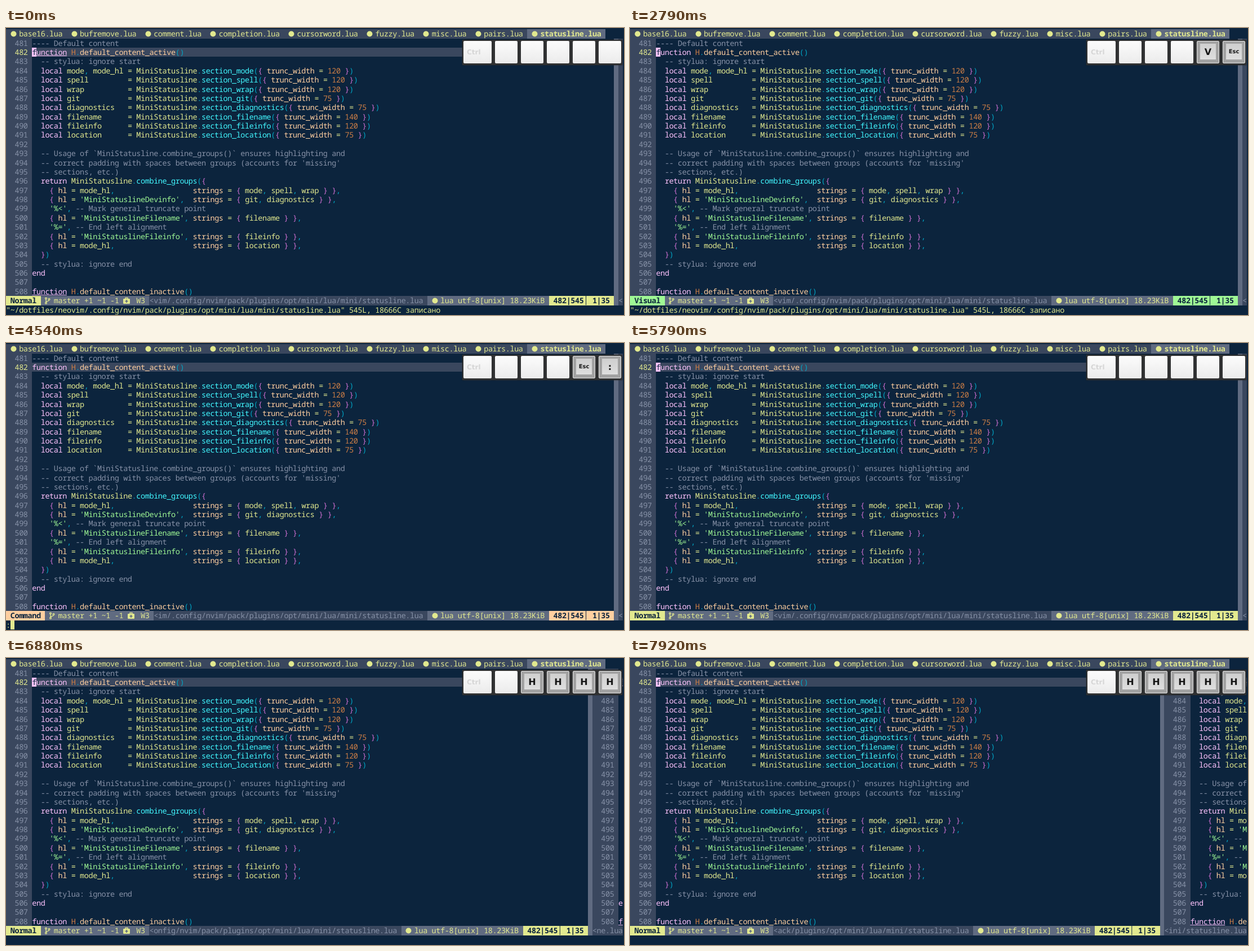
An HTML page for the animation above (8 s loop, 1097 by 511 pixels).

```html
<!DOCTYPE html>
<html lang="en">
<head>
<meta charset="utf-8">
<title>Editor statusline modes</title>
<style>
  :root {
    --w: 7.71px; --h: 16.38px;
    --bg: #0c243d; --bg1: #3a475e; --bg2: #606b81; --dim: #8691a7;
    --fg: #e2e98f; --peach: #ffcfa0; --orange: #cc7e46; --green: #9ff895;
    --purple: #ca6ecf; --cyan: #42f7ff; --pink: #ffc4ff; --blue: #00a5c5;
  }
  html, body { margin: 0; width: 100%; height: 100%; overflow: hidden; background: var(--bg); }
  #stage {
    position: relative; width: 1097px; height: 511px; overflow: hidden;
    background: var(--bg); color: var(--fg);
    font: 13.5px/var(--h) "Noto Sans Mono", "DejaVu Sans Mono", monospace;
    letter-spacing: calc(var(--w) - 1ch);
    font-variant-ligatures: none; font-kerning: none;
    text-rendering: geometricPrecision; white-space: pre;
  }
  #screen { position: absolute; left: 0; top: 2.3px; width: calc(var(--w) * 142); height: 509px; }
  .row { position: absolute; left: 0; height: var(--h); overflow: hidden; }
  #tabs { top: 0; width: 100%; }
  #tabs span, .status span { display: inline-block; height: var(--h); vertical-align: top; }
  #tabs .tab { background: var(--bg1); }
  #tabs .on { background: var(--bg2); font-weight: bold; }

  .win { position: absolute; top: var(--h); height: calc(var(--h) * 28); overflow: hidden; }
  .line { height: var(--h); width: 1100px; }
  .num { display: inline-block; width: calc(var(--w) * 6); height: var(--h); vertical-align: top; background: var(--bg1); color: var(--dim); }
  .here { background: var(--bg1); }
  .here .num { color: var(--fg); }
  .visual .here { background: none; }
  .mark .word { text-decoration: underline; }
  #split { position: absolute; top: var(--h); width: var(--w); height: calc(var(--h) * 29); background: var(--bg2); }

  .com { color: var(--dim); } .str { color: var(--green); } .kw { color: var(--pink); }
  .nr { color: var(--orange); } .fn { color: var(--cyan); } .fld { color: var(--peach); }
  .br { color: var(--purple); } .pn { color: var(--blue); }

  .status { top: calc(var(--h) * 29); background: var(--bg1); color: var(--dim); }
  .status .info { background: var(--bg2); color: var(--fg); }
  .status .mode { color: var(--bg); font-weight: bold; background: var(--mode); }
  #message { top: calc(var(--h) * 30); width: 100%; }

  #tabs .ico, .status .ico { position: relative; width: var(--w); }
  .ico svg { position: absolute; left: -1px; top: 2px; width: 13px; height: 13px; overflow: visible; }

  #cursor { position: absolute; height: var(--h); width: var(--w); overflow: hidden; color: var(--bg); background: var(--pink); }
  #cursor.insert { width: 2px; color: transparent; }
  #cursor.replace { height: 2px; margin-top: calc(var(--h) - 2px); color: transparent; }
  #cursor.command { background: var(--fg); color: transparent; }

  #keys {
    position: absolute; left: 810px; top: 21px; width: 284px; height: 45px;
    background: #303132; box-shadow: 0 0 2px #222;
    font-family: "DejaVu Sans", Verdana, sans-serif; font-weight: bold; letter-spacing: 0;
  }
  .key {
    position: absolute; top: 2px; width: 40px; height: 40px; box-sizing: border-box;
    line-height: 40px; text-align: center; color: #151515;
    background: linear-gradient(#fcfcfc, #ebebeb); border-radius: 2px;
  }
  .key.down {
    border: 1px solid #e8e8e8; line-height: 38px; font-size: 16px;
    background: linear-gradient(#cfcfcf, #dedede) 5px 4px / 28px 28px no-repeat #a2a2a2;
  }
  .key.long { font-size: 10px; }
  #ctrl { left: 2px; width: 50px; padding-left: 6px; font-size: 12px; text-align: left; color: #d6d6d6; }
</style>
</head>
<body>
<div id="stage">
  <div id="screen">
    <div id="tabs" class="row"></div>
    <div id="left" class="win"></div>
    <div id="split"></div>
    <div id="right" class="win mark"></div>
    <div id="leftStatus" class="row status"></div>
    <div id="rightStatus" class="row status"></div>
    <div id="message" class="row"></div>
    <div id="cursor">f</div>
  </div>
  <div id="keys"><div id="ctrl" class="key">Ctrl</div></div>
</div>
<script>
const W = 7.71, H = 16.38, COLS = 142, LOOP = 8000;
const $ = id => document.getElementById(id);
const span = (cls, text) => `<span class="${cls}">${text}</span>`;
const escapeHtml = s => s.replace(/&/g, '&amp;').replace(/</g, '&lt;');

const icon = shape => span('ico', `<svg viewBox="0 0 13 13" fill="#e2e98f" stroke="none">${shape}</svg>`);
const DOT = icon('<circle cx="6.5" cy="6.5" r="5"/>');
const BRANCH = icon('<g fill="none" stroke="#e2e98f" stroke-width="1.3"><circle cx="3" cy="2.5" r="1.4"/><circle cx="3" cy="10.8" r="1.4"/><circle cx="8.5" cy="4" r="1.4"/><path d="M3 4v5.4M8.5 5.4C8.5 8 3 6.5 3 9.4"/></g>');
const KIT = icon('<path d="M5 3V1.5h4V3" fill="none" stroke="#e2e98f" stroke-width="1.4"/><rect x="1" y="3" width="12" height="9" rx="1.2"/><path d="M7 5v5M4.5 7.5h5" stroke="#606b81" stroke-width="1.7"/>');

const PATH = '~/dotfiles/neovim/.config/nvim/pack/plugins/opt/mini/lua/mini/statusline.lua';
const MESSAGE = `"${PATH}" 545L, 18666C записано`;
const FILES = 'base16 bufremove comment completion cursorword fuzzy misc pairs statusline'.split(' ');

// Source text shown in both windows
const section = (vars, name, width) =>
  ('  local ' + vars).padEnd(22) + `= MiniStatusline.section_${name}({ trunc_width = ${width} })`;
const group = (hl, list) => `    { hl = ${hl},`.padEnd(37) + `strings = { ${list} } },`;
const CODE = [
  '---- Default content',
  'function H.default_content_active()',
  '  -- stylua: ignore start',
  section('mode, mode_hl', 'mode', 120),
  ...[['spell', 120], ['wrap', 120], ['git', 75], ['diagnostics', 75],
      ['filename', 140], ['fileinfo', 120], ['location', 75]].map(([n, w]) => section(n, n, w)),
  '',
  '  -- Usage of `MiniStatusline.combine_groups()` ensures highlighting and',
  "  -- correct padding with spaces between groups (accounts for 'missing'",
  '  -- sections, etc.)',
  '  return MiniStatusline.combine_groups({',
  group('mode_hl', 'mode, spell, wrap'),
  group("'MiniStatuslineDevinfo'", 'git, diagnostics'),
  "    '%<', -- Mark general truncate point",
  group("'MiniStatuslineFilename'", 'filename'),
  "    '%=', -- End left alignment",
  group("'MiniStatuslineFileinfo'", 'fileinfo'),
  group('mode_hl', 'location'),
  '  })',
  '  -- stylua: ignore end',
  'end',
  '',
  'function H.default_content_inactive()',
];

const RULES = [
  ['com', /--.*/], ['str', /'[^']*'/], ['kw word', /\bfunction\b/], ['kw', /\b(?:local|return|end)\b/],
  ['nr', /\b(?:\d+|H)\b/], ['fn', /\b(?:section_\w+|combine_groups)/],
  ['fld', /\b(?:trunc_width|hl|strings|default_\w+)\b/], ['br', /[{}]/], ['pn', /[.,()]/],
];
const LEXER = new RegExp(RULES.map(([, re]) => `(${re.source})`).join('|'), 'g');
const paint = line => line.replace(LEXER, (text, ...groups) =>
  span(RULES[groups.findIndex(g => g !== undefined)][0], escapeHtml(text)));

const codeHtml = CODE.map((line, i) =>
  `<div class="line${i === 1 ? ' here' : ''}">${span('num', `  ${481 + i} `)}${paint(line)}</div>`).join('');
$('left').innerHTML = $('right').innerHTML = codeHtml;
$('tabs').innerHTML = FILES.map((name, i) =>
  span(i === FILES.length - 1 ? 'on' : 'tab', ` ${DOT} ${name}.lua `)).join('');

const slots = Array.from({ length: 5 }, (_, i) => {
  const key = document.createElement('div');
  key.style.left = 58 + 46 * i + 'px';
  return $('keys').appendChild(key);
});

const MODE_COLOR = { Normal: 'fg', Insert: 'cyan', Visual: 'green', Replace: 'pink', Command: 'peach' };

// [start in ms, mode, pressed keys, column of the split]
const STEPS = [
  [0, 'Normal', '', 140], [830, 'Normal', 'I', 140], [920, 'Insert', 'I', 140],
  [1420, 'Insert', '', 140], [1540, 'Insert', 'Esc', 140], [1630, 'Normal', 'Esc', 140],
  [2130, 'Normal', '', 140], [2250, 'Visual', 'V', 140],
  [2790, 'Visual', 'V Esc', 140], [2880, 'Normal', 'V Esc', 140],
  [3330, 'Normal', 'Esc R', 140], [3380, 'Replace', 'Esc R', 140],
  [3880, 'Replace', 'R', 140], [3930, 'Replace', '', 140], [3990, 'Replace', 'Esc', 140],
  [4040, 'Normal', 'Esc', 140], [4540, 'Command', 'Esc :', 140],
  [5040, 'Command', ':', 140], [5080, 'Command', '', 140],
  [5290, 'Normal', 'Esc', 140], [5790, 'Normal', '', 140],
  [6330, 'Normal', 'H', 140], [6380, 'Normal', 'H', 138], [6540, 'Normal', 'H H', 138],
  [6710, 'Normal', 'H H H', 136], [6880, 'Normal', 'H H H H', 134], [6920, 'Normal', 'H H H H', 132],
  [7080, 'Normal', 'H H H H H', 132], [7130, 'Normal', 'H H H H H', 130],
  [7290, 'Normal', 'H H H H H', 128], [7500, 'Normal', 'H H H H H', 126],
  [7710, 'Normal', 'H H H H H', 124], [7920, 'Normal', 'H H H H H', 122],
];

const place = (el, col, width) => {
  el.style.left = col * W + 'px';
  el.style.width = width * W + 'px';
};
const tail = n => n > 0 ? '&lt;' + (n > 1 ? PATH.slice(1 - n) : '') : '';

function render([start, mode, keys, split]) {
  const rest = COLS - split - 1;
  const label = ` ${mode} `;
  place($('left'), 0, split);
  place($('leftStatus'), 0, split);
  place($('split'), split, 1);
  place($('right'), split + 1, rest);
  place($('rightStatus'), split + 1, rest);

  $('left').className = `win ${mode.toLowerCase()}${start < 920 ? ' mark' : ''}`;
  $('leftStatus').style.setProperty('--mode', `var(--${MODE_COLOR[mode]})`);
  $('leftStatus').innerHTML =
    span('mode', label) +
    span('info', ` ${BRANCH} master +1 ~1 -1 ${KIT}  W3 `) +
    span('', tail(split - 69 - label.length) + ' ') +
    span('info', ` ${DOT} lua utf-8[unix] 18.23KiB `) +
    span('mode', ' 482|545│ 1|35 ');
  $('rightStatus').innerHTML = tail(rest);

  const command = mode === 'Command';
  $('message').textContent = start < 4540 ? MESSAGE : command ? ':' : '';
  $('cursor').className = mode.toLowerCase();
  $('cursor').style.left = W * (command ? 1 : 6) + 'px';
  $('cursor').style.top = H * (command ? 30 : 2) + 'px';

  const names = keys ? keys.split(' ') : [];
  slots.forEach((slot, i) => {
    const name = names[i - slots.length + names.length] || '';
    slot.textContent = name;
    slot.className = 'key' + (name ? ' down' : '') + (name.length > 1 ? ' long' : '');
  });
}

let shown;
function tick() {
  const t = performance.now() % LOOP;
  const step = STEPS.findLast(s => s[0] <= t);
  if (step !== shown) render(shown = step);
  requestAnimationFrame(tick);
}
tick();
</script>
</body>
</html>
```
